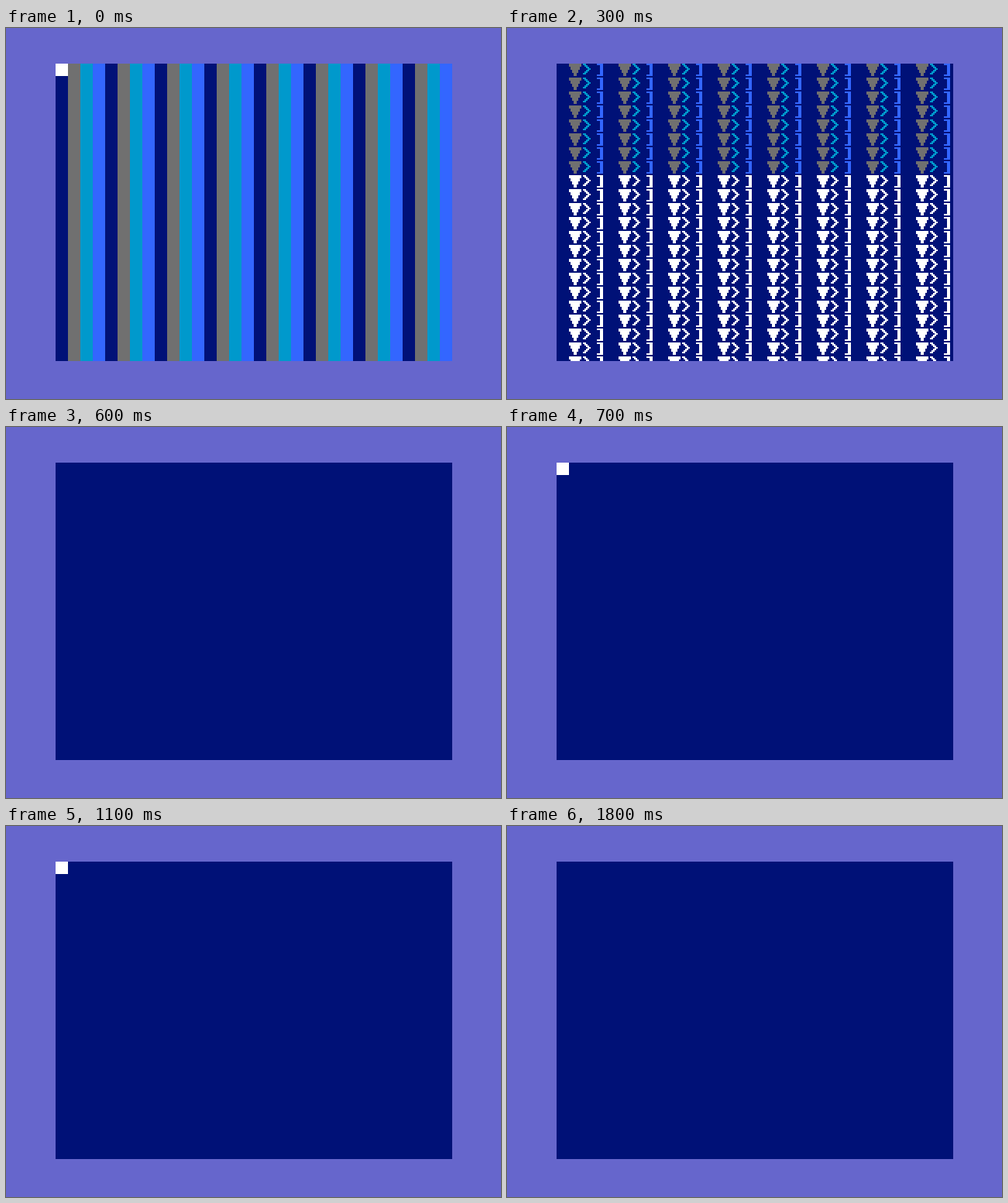
An HTML page with a canvas for the animation above (2000 ms loop, 639 by 479 pixels).

```html
<!DOCTYPE html>
<html>
<head>
<meta charset="utf-8">
<style>
html, body { margin: 0; width: 100%; height: 100%; overflow: hidden; background: #66c; }
canvas { position: absolute; left: 64px; top: 46px; width: 512px; height: 384px; image-rendering: pixelated; }
</style>
</head>
<body>
<canvas id="screen" width="256" height="192"></canvas>
<script>
const ctx = document.getElementById('screen').getContext('2d');
const NAVY = '#001177', WHITE = '#fff';
const STRIPES = [NAVY, '#707070', '#0099cc', '#3366ff'];
const CELL_W = 8, CELL_H = 9, COLS = 32, ROWS = 22;

// Character outlines on an 8 x 9 cell
const GLYPHS = {
  '▼': 'M0 0h8v2h-1v2h-1v2h-1v2h-2v-2h-1v-2h-1v-2h-1z',
  '>': 'M1 0h2v1h1v1h1v1h1v1h-1v1h-1v1h-1v1h-2v-1h1v-1h1v-1h1v-1h-1v-1h-1v-1h-1z',
  ']': 'M2 0h4v8h-4v-1h2v-6h-2z',
  '|': 'M6 0h2v8h-2',
  '‖': 'M1 0h2v8h-2M5 0h2v8h-2',
  '♠': 'M3 0h2v1h1v1h1v1h1v2h-3v1h2v1h-6v-1h2v-1h-3v-2h1v-1h1v-1h1z',
  '♣': 'M3 0h2v2h3v3h-3v1h2v1h-6v-1h2v-1h-3v-3h3z',
  '♦': 'M3 1h2v1h1v1h1v1h-1v1h-1v1h-2v-1h-1v-1h-1v-1h1v-1h1z',
  '♥': 'M1 1h2v1h2v-1h2v3h-1v1h-1v2h-2v-2h-1v-1h-1z',
  '☺': 'M1 0h6v1h1v6h-1v1h-6v-1h-1v-6h1zM1 1v6h6v-6zM2 2h1v1h-1M5 2h1v1h-1M2 5h4v1h-4',
  '+': 'M3 1h2v2h2v1h-2v2h-2v-2h-2v-1h2z',
  '?': 'M1 0h5v1h-5M0 1h2v1h-2M5 1h2v2h-2M3 3h3v1h-3M3 4h2v1h-2M3 6h2v1h-2',
  '!': 'M3 0h2v5h-2M3 6h2v1h-2',
  '#': 'M1 0h1v7h-1M4 0h1v7h-1M0 2h7v1h-7M0 4h7v1h-7',
  '*': 'M3 0h1v2h-1M3 5h1v2h-1M0 3h2v1h-2M5 3h2v1h-2M3 3h1v1h-1' +
       'M1 1h1v1h-1M2 2h1v1h-1M5 1h1v1h-1M4 2h1v1h-1M1 5h1v1h-1M2 4h1v1h-1M5 5h1v1h-1M4 4h1v1h-1',
  '@': 'M1 0h5v1h1v4h-4v-3h2v2h1v-3h-4v5h5v1h-6v-1h-1v-5h1z',
  '_': 'M0 7h8v1h-8',
  '—': 'M0 3h8v1h-8',
  '·': 'M3 3h2v2h-2',
  '▪': 'M2 2h4v4h-4',
  '↑': 'M3 0h2v1h1v1h1v1h-2v4h-2v-4h-2v-1h1v-1h1z',
  '←': 'M0 3h2v-1h1v-1h1v2h4v1h-4v2h-1v-1h-1v-1h-2z',
  '↖': 'M0 0h7v2h-2v1h1v1h1v1h1v3h-2v-1h-1v-1h-1v-1h-1v-1h-1v3h-2z',
  '‡': 'M3 0h2v1h2v1h-2v2h2v1h-2v2h-2v-2h-2v-1h2v-2h-2v-1h2z',
  '◄': 'M6 0h2v8h-2v-1h-2v-1h-2v-1h-2v-2h2v-1h2v-1h2z',
  '◢': 'M6 0h2v8h-8v-1h1v-1h1v-1h1v-1h1v-1h1v-1h1z',
  '⬓': 'M0 0h8v8h-8zM1 1v3h6v-3z',
  '◙': 'M0 0h8v8h-8zM2 1v1h-1v4h1v1h4v-1h1v-4h-1v-1zM3 3h2v2h-2',
  '□': 'M0 0h8v8h-8zM2 2v4h4v-4z',
  '▖': 'M0 4h4v4h-4',
  '▚': 'M0 0h4v4h-4M4 4h4v4h-4',
  '▛': 'M0 0h8v4h-4v4h-4z',
  '▜': 'M0 0h8v8h-4v-4h-4z',
  '▒': 'M0 0h1v8h-1M2 0h1v8h-1M4 0h1v8h-1M6 0h1v8h-1M0 0v1h8v-1M0 2v1h8v-1M0 4v1h8v-1M0 6v1h8v-1',
  '╯': 'M6 0h2v2h-1v1h-2v1h-3v-1h2v-1h2z',
  '╚': 'M0 0h2v6h6v2h-8zM4 1h2v1h2v1h-2v1h-2z',
  '╩': 'M2 1h1v2h2v-2h1v2h2v2h-8v-2h2z',
  '┌': 'M3 2h5v2h-3v4h-2z',
  '└': 'M2 0h2v5h4v2h-6z',
  '0': 'M1 0h5v1h1v5h-1v1h-5v-1h-1v-5h1zM2 1v5h3v-5zM3 3h1v1h-1',
  '8': 'M1 0h5v1h1v2h-1v1h1v2h-1v1h-5v-1h-1v-2h1v-1h-1v-2h1zM2 1v2h3v-2zM2 4v2h3v-2z',
  '9': 'M1 0h5v1h1v5h-1v1h-5v-1h4v-2h-4v-1h-1v-2h1zM2 1v2h3v-2z',
  'F': 'M-2 0h8v1h-4v2h2v1h-2v3h2v1h-6v-1h2v-6h-2z',
  'H': 'M0 0h2v3h3v-3h2v7h-2v-3h-3v3h-2z',
  'X': 'M0 0h2v1h1v1h2v-1h1v-1h2v2h-1v1h-1v2h1v1h1v2h-2v-1h-1v-1h-2v1h-1v1h-2v-2h1v-1h1v-2h-1v-1h-1z',
  'g': 'M1 2h6v6h-1v1h-5v-1h4v-1h-4v-1h-1v-3h1zM2 3v3h3v-3z',
  'm': 'M0 2h7v5h-1v-4h-1v3h-2v-3h-1v4h-2z',
  'n': 'M0 2h6v1h1v4h-2v-4h-3v4h-2z',
  'o': 'M2 1h4v1h1v4h-1v1h-4v-1h-1v-4h1zM3 3v2h2v-2z',
  'p': 'M0 2h6v1h1v2h-1v1h-4v2h-2zM2 3v2h3v-2z'
};
for (const ch in GLYPHS) GLYPHS[ch] = new Path2D(GLYPHS[ch]);

const GARBAGE = [
  '|♠ ♣|♠☺+?— ▪ ↑    F⬓ ◢8◙ ▖▚▛▜╯‡',
  ' ◙←   *♦*@╚◙‖H 0!X↖□╩*♦╚◙X  ▒ ↖▜',
  '┌◄X↖□!╩  └┌◙ ↖o◄  !╩  !◄□▪o·9◙◢8',
  '◙▜▛╯ _ ▒  ♦|♦ g*◢— ▪m↑  ♥ F⬓ — ▪',
  'p↑   ┌◙ ↑‡  — ▪  F⬓ — · ↑ #n F⬓',
  '╯  ▒  ♠|♠ ·  nn↑  ↑ F⬓ *]H ▜*F'
];

function put(ch, col, row, color) {
  if (!GLYPHS[ch]) return;
  ctx.save();
  ctx.translate(col * CELL_W, row * CELL_H);
  ctx.fillStyle = color;
  ctx.fill(GLYPHS[ch]);
  ctx.restore();
}

function stripes() {
  for (let col = 0; col < COLS; col++) {
    ctx.fillStyle = STRIPES[col % 4];
    ctx.fillRect(col * CELL_W, 0, CELL_W, 192);
  }
}

function pattern() {
  for (let row = 0; row < ROWS; row++)
    for (let col = 0; col < COLS; col++)
      put(' ▼>]'[col % 4], col, row, row < 8 ? STRIPES[col % 4] : WHITE);
}

function garbage() {
  GARBAGE.forEach((line, i) => [...line].forEach((ch, col) => put(ch, col, 16 + i, WHITE)));
}

const BLINKS = [300, 400, 500, 700, 900, 1100, 1400, 1600, 1800];

function draw(t) {
  ctx.fillStyle = NAVY;
  ctx.fillRect(0, 0, 256, 192);
  if (t < 100) stripes();
  else if (t < 400) pattern();
  else if (t < 600) garbage();
  if (BLINKS.filter(b => b <= t).length % 2 === 0) {
    ctx.fillStyle = WHITE;
    ctx.fillRect(0, 0, 8, 8);
  }
}

function tick() {
  draw(performance.now() % 2000);
  requestAnimationFrame(tick);
}
tick();
</script>
</body>
</html>
```
